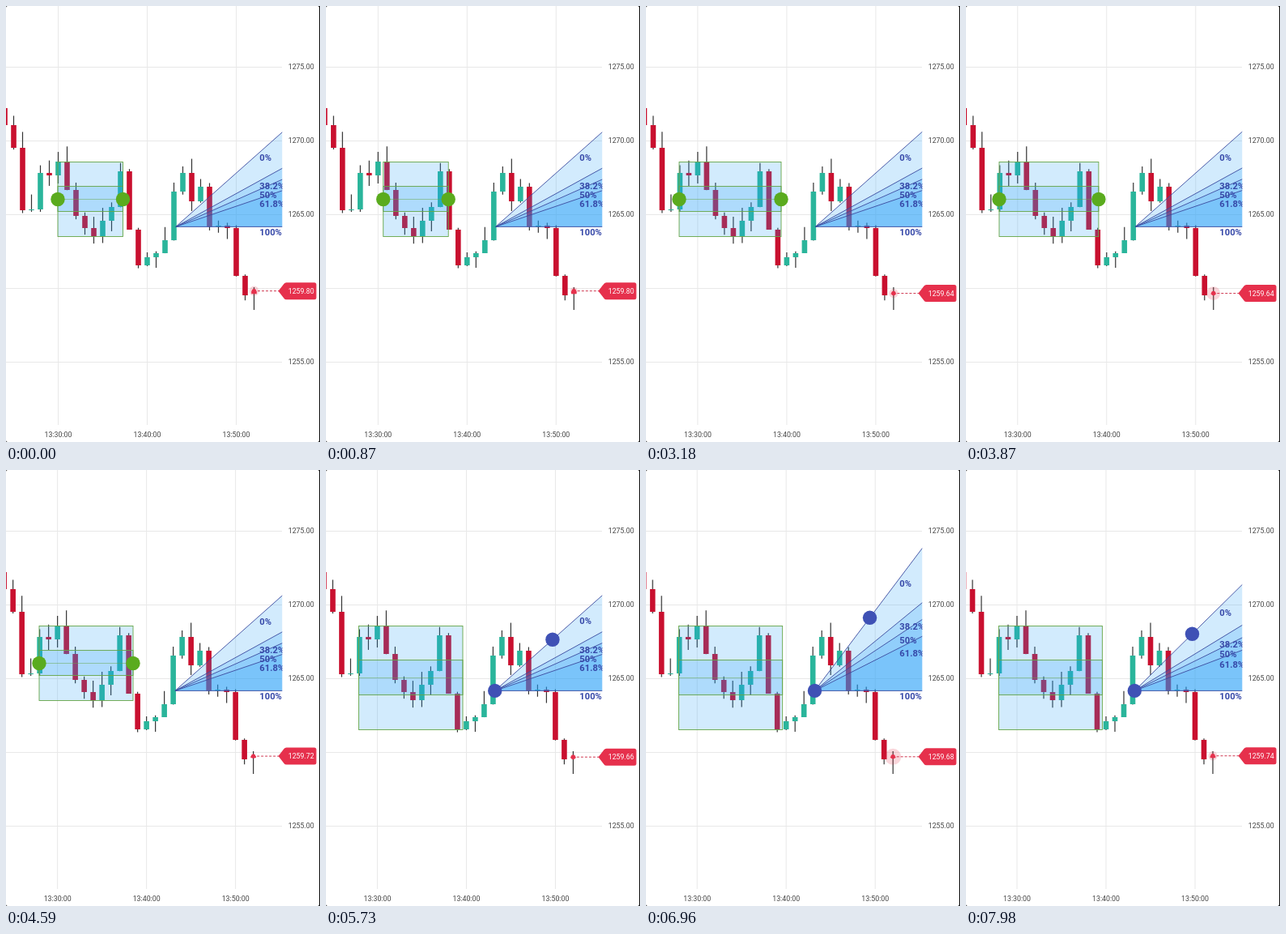
Recreate the animation shown at these times as an HTML page. Size 388x538 px, loop 8000 ms.

```html
<!DOCTYPE html>
<html lang="en">
<head>
<meta charset="utf-8">
<title>Chart drawing tools</title>
<style>
  html, body { margin: 0; width: 100%; height: 100%; overflow: hidden; background: #fff; }
  svg { display: block; width: 388px; height: 538px; font-family: Roboto, sans-serif; }
  .axis { font-size: 8.8px; fill: #444; }
  .level { font-size: 11.2px; font-weight: 700; fill: #3648a8; }
</style>
</head>
<body>
<svg id="stage" viewBox="0 0 388 538">
  <defs><clipPath id="plot"><path d="M0 0H341.5V538H0Z"/></clipPath></defs>
  <rect width="388" height="538" fill="#111"/>
  <rect width="387" height="538" rx="2" fill="#fff"/>
  <g id="grid" stroke="#e8e8e8"></g>
  <g id="chart" clip-path="url(#plot)"></g>
  <g id="box" stroke="#66a648" stroke-width=".9"></g>
  <g id="fan" clip-path="url(#plot)"></g>
  <g id="boxGrips" fill="#5aab1e"></g>
  <g id="fanGrips" fill="#3f51b5"></g>
  <g id="price"></g>
</svg>
<script>
const LOOP = 8000, STEP = 11, EDGE = 341.5;
const RED = '#e6304c', UP = '#2ab59b', DOWN = '#c9102f';
const SELECT_FAN = 5420;
const $ = id => document.getElementById(id);

function set(el, attrs) {
  for (const k in attrs) el.setAttribute(k, attrs[k]);
}
function add(parent, tag, attrs = {}, text) {
  const el = document.createElementNS('http://www.w3.org/2000/svg', tag);
  set(el, attrs);
  if (text !== undefined) el.textContent = text;
  return parent.appendChild(el);
}

// Eased progress from 0 to 1 between two times
function ease(t, from, to) {
  const u = Math.min(1, Math.max(0, (t - from) / (to - from)));
  return u * u * (3 - 2 * u);
}
const noise = n => {
  const v = Math.sin(n * 12.9898) * 43758.5453;
  return v - Math.floor(v);
};
const snap = v => Math.floor(v) + .5;
const priceY = p => 75 + (1275 - p) * 18.2;

// Each bar opens where the one before closed; bar 0 is at 13:30
const closes = [147, 175, 252, 251, 206, 209, 192, 227, 259, 274, 284, 265, 248, 204,
  276, 320, 310, 305, 289, 229, 206, 241, 223, 272, 271, 274, 333, 357];
const bars = closes.map((close, i) => {
  const n = i - 6, open = i ? closes[i - 1] : 126;
  const top = Math.min(open, close), bottom = Math.max(open, close);
  return {
    x: n * STEP, n, top, bottom, color: close < open ? UP : DOWN,
    high: top - 20 * noise(n + 40), low: bottom + 15 * noise(n + 90) ** 2
  };
});

// Price scale
for (let p = 1255; p <= 1275; p += 5) {
  const y = priceY(p);
  add($('grid'), 'path', { d: `M0 ${snap(y)}H341` });
  if (p !== 1260) add($('stage'), 'text', { class: 'axis', x: 348.7, y: y + 3.4 }, p.toFixed(2));
}

// Scrolling part, with x = 0 at 13:30
const scroll = add($('chart'), 'g');
for (let i = 0; i < 3; i++) {
  const x = i * 10 * STEP;
  add(scroll, 'path', { d: `M${x} 0V517`, stroke: '#e8e8e8' });
  add(scroll, 'text', { class: 'axis', x, y: 532.2, 'text-anchor': 'middle' }, `13:${30 + i * 10}:00`);
}
const wick = (x, high, low) =>
  add(scroll, 'path', { d: `M${x} ${high}V${low}`, stroke: '#333', 'stroke-width': 1.2 });
for (const { x, top, bottom, high, low, color } of bars) {
  wick(x, high, low);
  add(scroll, 'rect', { x: x - 3.3, y: top, width: 6.6, height: bottom - top, fill: color });
}
const LAST = 22 * STEP;
wick(LAST, 347, 375);
const lastBar = add(scroll, 'rect', { x: LAST - 3.3, width: 6.6 });

// Range box
const tint = { fill: '#1f9bf6', 'fill-opacity': .2 };
const frame = add($('box'), 'rect', tint);
const band = add($('box'), 'rect', tint);
const middle = add($('box'), 'path', { 'stroke-opacity': .55 });
const grips = id => [0, 1].map(() => add($(id), 'circle', { r: 8.7 }));
const boxGrips = grips('boxGrips');

// Fan
const levels = [0, .382, .5, .618, 1].map(v => ({
  v,
  area: add($('fan'), 'path', tint),
  line: add($('fan'), 'path', { stroke: '#3a4a9f', 'stroke-width': .9 })
}));
for (const l of levels)
  l.text = add($('fan'), 'text', { class: 'level', x: 313.3 }, +(l.v * 100).toFixed(1) + '%');
const fanGrips = grips('fanGrips');

// Current price
const halo = add($('price'), 'circle', { fill: RED, 'fill-opacity': .2 });
const dot = add($('price'), 'circle', { r: 2.7, fill: RED });
const dash = add($('price'), 'path', { stroke: '#cf3a52', 'stroke-dasharray': '3 2' });
const tag = add($('price'), 'g');
add(tag, 'path', { d: 'M336.5 0L343.5 -9Q344.5 -10.5 346.5 -10.5H381Q383.5 -10.5 383.5 -8V8Q383.5 10.5 381 10.5H346.5Q344.5 10.5 343.5 9Z', fill: RED });
const tagText = add(tag, 'text', { x: 348.7, y: 3.2, 'font-size': 8.8, fill: '#fff' });

// Dragged as a whole, then by its left grip, then by its right one
function drawBox(t, x0) {
  const shift = 14.5 * ease(t, 300, 1500);
  const left = 64 + shift - 37.5 * ease(t, 1900, 2800) - .5 * ease(t, 4600, 5700);
  const right = 144.5 + shift + 8 * ease(t, 2300, 3100) - 10 * ease(t, 3500, 4500)
    + 12 * ease(t, 4650, 5200) - .6 * ease(t, 5700, LOOP);
  const inside = bars.filter(b => b.n > (left - x0) / STEP - .2 && b.n < (right - x0) / STEP - .5);
  const top = Math.min(...inside.map(b => b.top));
  const bottom = Math.max(...inside.map(b => b.bottom));
  const third = (bottom - top) / 3, mid = snap((top + bottom) / 2), width = right - left;
  set(frame, { x: left, y: snap(top), width, height: bottom - top });
  set(band, { x: left, y: snap(top + third), width, height: Math.round(third) });
  set(middle, { d: `M${left} ${mid}H${right}` });
  boxGrips.forEach((g, i) => set(g, { cx: i ? right : left, cy: mid }));
}

// Pulled steeply up and let down again
function drawFan(t, x0) {
  const pull = ease(t, 6270, 6730) - .912 * ease(t, 6730, 7107);
  const slope = .887 + 1.113 * pull, reach = 71.2 - 8 * (pull > .1 ? pull : 0);
  const ax = x0 + 145.3, ay = 272.4;
  for (const { v, area, line, text } of levels) {
    const k = slope * (1 - v), ray = `M${ax} ${ay}L${EDGE} ${ay - k * (EDGE - ax)}`;
    set(area, { d: `${ray}V${ay}Z` });
    set(line, { d: ray });
    set(text, { y: ay - k * (313.3 - ax) + 10.7 });
  }
  set(fanGrips[0], { cx: ax, cy: ay });
  set(fanGrips[1], { cx: ax + reach, cy: ay - reach * slope });
}

// Each tick: start time and new price
const ticks = [[0, 1259.80], [900, 1259.96], [2450, 1259.64], [3900, 1259.72],
  [5200, 1259.66], [6350, 1259.68], [7450, 1259.74]];

function drawPrice(t, x0) {
  const i = ticks.findLastIndex(([start]) => start <= t);
  const [start, now] = ticks[i], before = ticks[Math.max(0, i - 1)][1];
  const p = before + (now - before) * ease(t, start, start + 250);
  const y = priceY(p), x = x0 + LAST;
  set(lastBar, { y: Math.min(y, 354.5), height: Math.max(1, 355.2 - y), fill: p > 1259.88 ? UP : RED });
  set(halo, { cx: x, cy: y, r: 6 + 5 * Math.sin(t / 1600 * 2 * Math.PI) });
  set(dot, { cx: x, cy: y });
  set(dash, { d: `M${x + 4.5} ${y}H337` });
  set(tag, { transform: `translate(0 ${y})` });
  tagText.textContent = now.toFixed(2);
}

function draw(t) {
  const x0 = 64.5 - 1.5 * t / LOOP;
  set(scroll, { transform: `translate(${x0} 0)` });
  drawBox(t, x0);
  drawFan(t, x0);
  drawPrice(t, x0);
  set($('boxGrips'), { visibility: t < SELECT_FAN ? 'visible' : 'hidden' });
  set($('fanGrips'), { visibility: t < SELECT_FAN ? 'hidden' : 'visible' });
}

const begin = performance.now();
function tick() {
  draw((performance.now() - begin) % LOOP);
  requestAnimationFrame(tick);
}
draw(0);
requestAnimationFrame(tick);
</script>
</body>
</html>
```
